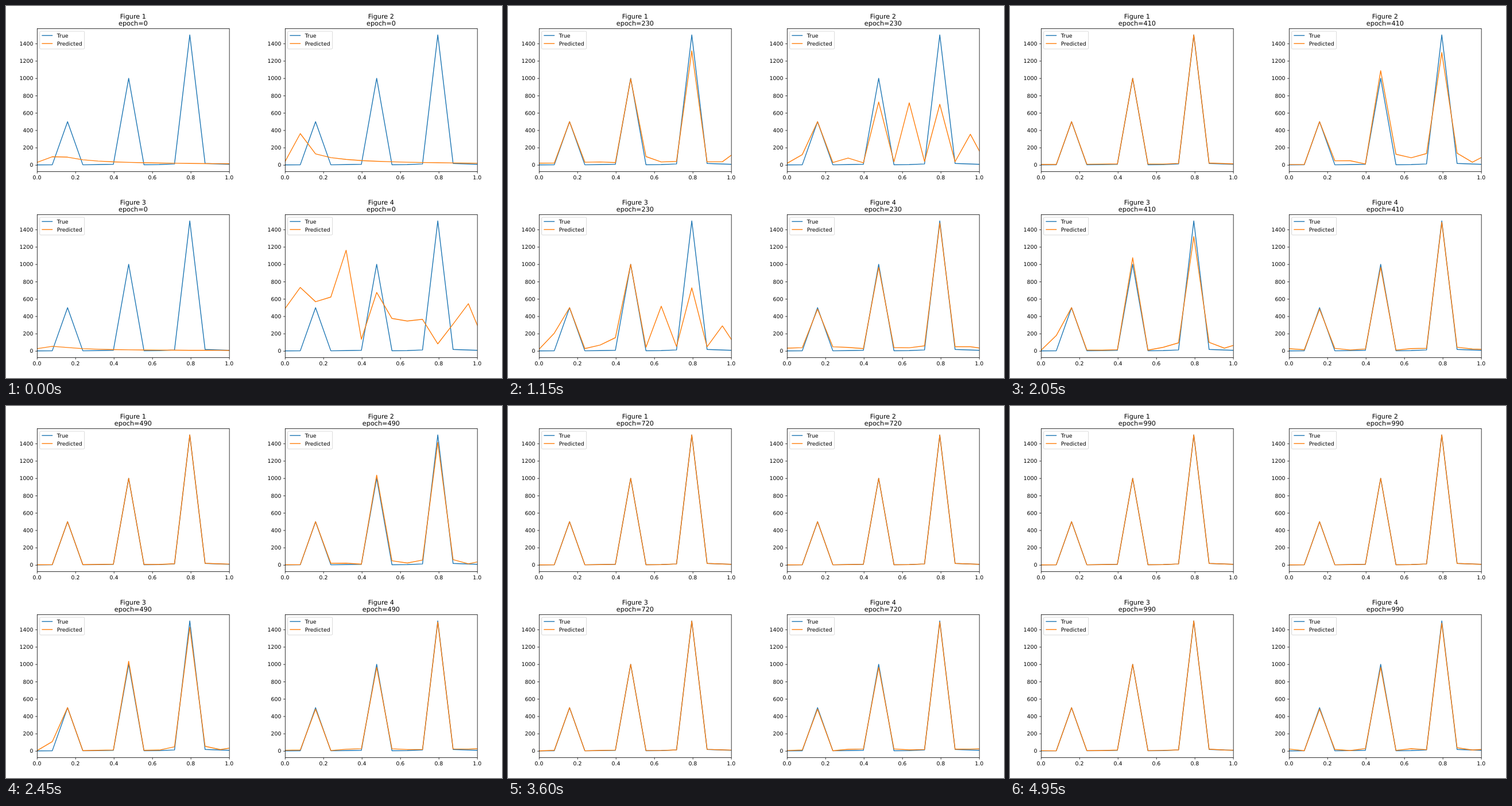
These frames come from a looping animation (864x648 px, 5000 ms). An HTML page with a canvas:

```html
<!DOCTYPE html>
<html lang="en">
<head>
<meta charset="utf-8">
<title>Training curves</title>
<style>
html, body { margin: 0; width: 100%; height: 100%; overflow: hidden; background: #fff; }
canvas { display: block; }
</style>
</head>
<body>
<canvas id="stage" width="864" height="648"></canvas>
<script>
const ctx = document.getElementById('stage').getContext('2d');
const LOOP = 5000, STEP = 50, EPOCHS_PER_STEP = 10;
const BLUE = '#1f77b4', ORANGE = '#ff7f0e';
const BOX = { left: 54, right: 388.8, top: 39, bottom: 288.1 };
const SPINE_SHIFT = 0.35;
const Y_MIN = -74, Y_MAX = 1575, X_GAP = 0.0795;

const truth = [1, 2, 500, 2, 4, 8, 1000, 3, 4, 12, 1500, 18, 11, 6];

const random = i => { const s = Math.sin(i * 12.9898 + 4.1) * 43758.5453; return s - Math.floor(s); };
const bell = (e, center, spread) => Math.exp(-(((e - center) / spread) ** 2));
const rise = (e, tau, power) => 1 - Math.exp(-((e / tau) ** power));

// Untrained output: a hyperbolic tail behind the first two points.
const tail = (origin, first, scale) => i => i === 0 ? origin : i === 1 ? first : scale / i;
const rough = i => [488, 733, 568, 622, 1162, 135, 675, 375, 345, 365, 82, 310, 545, 121][i];

// A temporary error at some points: it swells and dies around one epoch.
const bump = (points, height, center, spread) => ({ points, height, center, spread });

// peaks: point -> [time constant, power] of its rise to the true height
const panels = [
  {
    x: 0, y: 0, start: tail(30, 95, 180), noise: 45, settle: 0, gain: 1,
    peaks: { 2: [71, 2], 6: [148, 3.8], 10: [189, 3.8] },
    bumps: [
      bump([4], 270, 100, 65), bump([8], 200, 100, 65), bump([12], 110, 100, 65),
      bump([7], 60, 230, 60), bump([13], 140, 230, 60)
    ]
  },
  {
    x: 432, y: 0, start: tail(38, 362, 255), noise: 40, settle: 0, gain: 1,
    peaks: { 2: [71, 2], 6: [200, 1.8], 10: [290, 2] },
    bumps: [
      bump([4], 380, 110, 85), bump([8], 695, 220, 109), bump([12], 325, 220, 109),
      bump([1], 100, 230, 80), bump([6, 7, 9, 11, 13], 115, 400, 90), bump([3, 4, 8], 40, 410, 80)
    ]
  },
  {
    x: 0, y: 324, start: tail(27, 53, 80), noise: 35, settle: 3, gain: 1,
    peaks: { 2: [80, 2], 6: [121, 3], 10: [282, 2] },
    bumps: [
      bump([4], 310, 110, 85), bump([8], 590, 170, 140), bump([12], 310, 170, 140),
      bump([1], 215, 310, 210), bump([5], 130, 230, 90),
      bump([7, 9, 11], 75, 110, 90), bump([6, 9, 11, 13], 75, 410, 90)
    ]
  },
  {
    x: 432, y: 324, start: rough, noise: 40, settle: 22, gain: 0.965,
    peaks: { 2: [68, 2], 6: [45, 2], 10: [45, 2] },
    bumps: [bump([10], 60, 110, 60), bump([10], 40, 600, 600)]
  }
];

const px = v => BOX.left + v * (BOX.right - BOX.left);
const py = v => BOX.bottom - (v - Y_MIN) / (Y_MAX - Y_MIN) * (BOX.bottom - BOX.top);

function predict(panel, i, epoch) {
  const { start, noise, settle, gain, peaks, bumps } = panel;
  const untrained = Math.exp(-epoch / 35);
  let learned = truth[i];
  if (peaks[i]) {
    learned *= gain * rise(epoch, ...peaks[i]);
  } else {
    learned += noise * (0.5 + random(i)) * bell(epoch, 0, 280);
    learned += settle * (0.5 + 0.5 * Math.sin(i * 2.3 + epoch * 0.11));
  }
  for (const { points, height, center, spread } of bumps) {
    if (points.includes(i)) learned += height * bell(epoch, center, spread);
  }
  return start(i) * untrained + learned * (1 - untrained);
}

function stroke(points, color, width) {
  ctx.beginPath();
  points.forEach(([x, y]) => ctx.lineTo(x, y));
  ctx.strokeStyle = color;
  ctx.lineWidth = width;
  ctx.stroke();
}

function text(label, x, y, size, align) {
  ctx.font = `${size}px "DejaVu Sans", sans-serif`;
  ctx.textAlign = align;
  ctx.fillStyle = '#000';
  ctx.fillText(label, x, y);
}

function curve(values, color) {
  stroke(values.map((v, i) => [px(i * X_GAP), py(v)]), color, 1.41);
}

function axes() {
  const left = BOX.left + SPINE_SHIFT, bottom = BOX.bottom + SPINE_SHIFT;
  for (let v = 0; v <= 1400; v += 200) {
    const y = py(v) + SPINE_SHIFT;
    stroke([[left - 3.3, y], [left, y]], '#000', 0.75);
    text(v, BOX.left - 6.6, py(v) + 3.5, 9.375, 'right');
  }
  for (let i = 0; i <= 5; i++) {
    const x = px(i / 5) + SPINE_SHIFT;
    stroke([[x, bottom], [x, bottom + 3.3]], '#000', 0.75);
    text((i / 5).toFixed(1), px(i / 5), BOX.bottom + 14.2, 9.375, 'center');
  }
  ctx.strokeStyle = '#000';
  ctx.lineWidth = 0.8;
  ctx.strokeRect(left, BOX.top + SPINE_SHIFT, BOX.right - BOX.left, BOX.bottom - BOX.top);
}

function legend() {
  ctx.beginPath();
  ctx.roundRect(58.7, 43.9, 78, 31, 1.9);
  ctx.fillStyle = 'rgba(255,255,255,0.8)';
  ctx.fill();
  ctx.strokeStyle = 'rgba(204,204,204,0.8)';
  ctx.lineWidth = 0.94;
  ctx.stroke();
  [['True', BLUE], ['Predicted', ORANGE]].forEach(([label, color], i) => {
    const y = 51.4 + i * 14;
    stroke([[62.4, y], [81.2, y]], color, 1.41);
    text(label, 88.7, y + 3.4, 9.375, 'left');
  });
}

function drawPanel(panel, index, epoch) {
  ctx.save();
  ctx.translate(panel.x, panel.y);
  const middle = px(0.5);
  text(`Figure ${index + 1}`, middle, 21.8, 11.25, 'center');
  text(`epoch=${epoch}`, middle, 33.9, 11.25, 'center');

  ctx.save();
  ctx.beginPath();
  ctx.rect(BOX.left, BOX.top, BOX.right - BOX.left, BOX.bottom - BOX.top);
  ctx.clip();
  ctx.lineJoin = 'round';
  curve(truth, BLUE);
  curve(truth.map((_, i) => predict(panel, i, epoch)), ORANGE);
  ctx.restore();

  axes();
  legend();
  ctx.restore();
}

function draw() {
  const epoch = Math.floor(performance.now() % LOOP / STEP) * EPOCHS_PER_STEP;
  ctx.textRendering = 'geometricPrecision';
  ctx.fillStyle = '#fff';
  ctx.fillRect(0, 0, 864, 648);
  panels.forEach((panel, i) => drawPanel(panel, i, epoch));
  requestAnimationFrame(draw);
}
draw();
</script>
</body>
</html>
```
